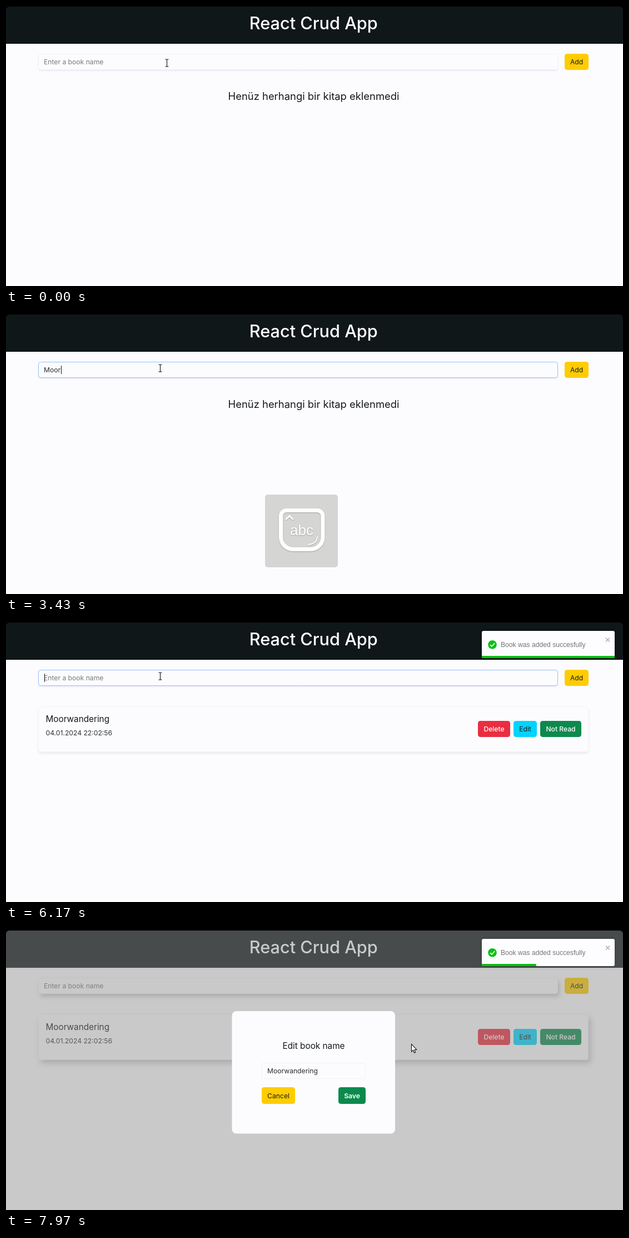
Write an HTML page with a canvas that moves like this. It is 1110 px wide and 504 px high and loops after 8 s.

```html
<!DOCTYPE html>
<html lang="tr">
<head>
<meta charset="utf-8">
<title>React Crud App</title>
<style>
html, body { margin: 0; width: 100%; height: 100%; overflow: hidden; background: #fcfcfe; }
canvas { display: block; width: 1110px; height: 504px; }
</style>
</head>
<body>
<canvas id="stage" width="1110" height="504"></canvas>
<script>
const ctx = document.getElementById('stage').getContext('2d');
const LOOP = 8000;
const BG = '#fcfcfe', INK = '#15191b', GREEN = '#0c8a4e', YELLOW = '#ffcc00', TOAST_GREEN = '#07c20f';
const SANS = 'Inter, sans-serif', ARIAL = '"Liberation Sans", Arial, sans-serif';
const BOOK = 'Moorwandering';
const KEYS = [1670, 2090, 2130, 2370, 3500, 3730, 3870, 4030, 4200, 4470, 4600, 4700, 4830];
const FOCUS = 470, CAPS_ON = 870, CAPS_OFF = 2070, ENTER = 5040;
const TOAST = 5360, TIMER = 6200, EDIT = 7480;

const clamp = v => Math.max(0, Math.min(1, v));
const part = (t, a, b) => clamp((t - a) / (b - a));
const mix = (a, b, k) => a + (b - a) * k;
const smooth = k => k * k * (3 - 2 * k);

// y of a CSS cubic-bezier at x
function bezier(x1, y1, x2, y2, x) {
  const at = (a, b, u) => 3 * a * u * (1 - u) ** 2 + 3 * b * u * u * (1 - u) + u ** 3;
  let lo = 0, hi = 1;
  for (let i = 0; i < 24; i++) {
    const mid = (lo + hi) / 2;
    if (at(x1, x2, mid) < x) lo = mid; else hi = mid;
  }
  return at(y1, y2, lo);
}

function text(str, x, y, size, color, weight = 400, align = 'left', family = SANS) {
  ctx.font = `${weight} ${size}px ${family}`;
  ctx.textAlign = align;
  ctx.fillStyle = color;
  ctx.fillText(str, x, y);
}

function box(x, y, w, h, r, fill, line) {
  ctx.beginPath();
  ctx.roundRect(x, y, w, h, r);
  if (fill) { ctx.fillStyle = fill; ctx.fill(); }
  if (line) { ctx.strokeStyle = line; ctx.lineWidth = 1; ctx.stroke(); }
}

function shadowed(color, dx, dy, blur, draw) {
  ctx.save();
  ctx.shadowColor = color;
  ctx.shadowOffsetX = dx;
  ctx.shadowOffsetY = dy;
  ctx.shadowBlur = blur;
  draw();
  ctx.restore();
}

function line(points, color, width) {
  ctx.beginPath();
  points.forEach(([x, y]) => ctx.lineTo(x, y));
  ctx.strokeStyle = color;
  ctx.lineWidth = width;
  ctx.stroke();
}

const buttons = {
  add: { x: 1005, y: 86, w: 43, h: 29, label: 'Add', fill: YELLOW, hover: '#ffd633', ink: INK, weight: 400 },
  del: { x: 849, y: 178, w: 58, h: 29, label: 'Delete', fill: '#ea2d40', hover: '#c9283a', ink: '#fff', weight: 500 },
  edit: { x: 913, y: 178, w: 42, h: 29, label: 'Edit', fill: '#02d4ff', hover: '#29deff', ink: INK, weight: 400 },
  read: { x: 961, y: 178, w: 74, h: 29, label: 'Not Read', fill: GREEN, hover: '#0a7441', ink: '#fff', weight: 500 },
  cancel: { x: 460, y: 283, w: 60, h: 30, label: 'Cancel', fill: YELLOW, ink: INK, weight: 400 },
  save: { x: 598, y: 283, w: 49, h: 30, label: 'Save', fill: GREEN, ink: '#fff', weight: 600 }
};
const inside = (b, p) => p.x >= b.x && p.x <= b.x + b.w && p.y >= b.y && p.y <= b.y + b.h;

function button(b, pointer) {
  box(b.x, b.y, b.w, b.h, 4.5, pointer && inside(b, pointer) ? b.hover : b.fill);
  text(b.label, b.x + b.w / 2, b.y + b.h / 2 + 4.5, 12.15, b.ink, b.weight, 'center');
}

const field = { x: 58.5, y: 86.5, w: 934, h: 28 };

function pointerAt(t) {
  if (t < 6400) {
    const k = smooth(part(t, 10, 330));
    return { x: mix(289, 277, k), y: mix(102, 97, k) };
  }
  if (t < EDIT) {
    const k = smooth(part(t, 6400, 7220)), j = 1 - k;
    return {
      x: j * j * 277 + 2 * j * k * 650 + k * k * 926,
      y: j * j * 97 + 2 * j * k * 250 + k * k * 180
    };
  }
  const k = smooth(part(t, EDIT + 40, 7940));
  return { x: mix(926, 729, k), y: mix(180, 205, k) };
}

function drawField(t, modal) {
  const focus = modal ? 0 : part(t, FOCUS - 30, FOCUS + 30);
  shadowed(modal ? 'rgba(50,50,80,.26)' : 'rgba(80,80,190,.13)', modal ? 3 : 0, modal ? 5 : 2, modal ? 9 : 3,
    () => box(field.x, field.y, field.w, field.h, 4, BG));
  box(field.x, field.y, field.w, field.h, 4, BG, '#f3f3f5');
  ctx.globalAlpha = focus;
  box(field.x, field.y, field.w, field.h, 4, null, '#96c3f6');
  ctx.globalAlpha = 1;

  const count = t < ENTER ? KEYS.filter(k => k <= t).length : 0;
  const typed = BOOK.slice(0, count);
  text(typed || 'Enter a book name', 68, 105, 12.15, typed ? '#2b2f32' : '#77787c');
  if (!focus) return;
  const since = [FOCUS - 30, ...KEYS, ENTER].filter(k => k <= t).pop();
  if (Math.floor((t - since) / 530) % 2 === 0) {
    ctx.fillStyle = '#111';
    ctx.fillRect(Math.round(68.6 + (typed ? ctx.measureText(typed).width : 0)), 93, 1, 15);
  }
}

function drawItem(pointer, modal) {
  shadowed(modal ? 'rgba(50,50,80,.28)' : 'rgba(120,120,110,.15)', modal ? 4 : 0, modal ? 6 : 3, modal ? 11 : 4,
    () => box(58.5, 152.5, 989, 81, 4, BG));
  box(58.5, 152.5, 989, 81, 4, BG, '#f4f4f9');
  text(BOOK, 71.5, 180, 15.3, INK);
  text('04.01.2024 22:02:56', 71.5, 204, 12.15, '#2b2f32');
  ['del', 'edit', 'read'].forEach(id => button(buttons[id], pointer));
}

function drawPage(t, pointer, modal) {
  ctx.fillStyle = BG;
  ctx.fillRect(0, 0, 1110, 504);
  ctx.fillStyle = '#101719';
  ctx.fillRect(0, 0, 1110, 68);
  text('React Crud App', 553.3, 41.5, 30.65, '#fff', 500, 'center');
  drawField(t, modal);
  button(buttons.add, pointer);
  if (t < ENTER) text('Henüz herhangi bir kitap eklenmedi', 553.5, 169, 18.4, INK, 400, 'center');
  else drawItem(pointer, modal);
}

// caps lock indicator
function drawCaps(t) {
  if (t < CAPS_ON || t > 5230) return;
  ctx.save();
  ctx.globalAlpha = 1 - part(t, 4600, 5230);
  box(466, 325, 131, 131, 5, '#d5d6d4');
  shadowed('rgba(90,90,90,.4)', 0, 1, 2, () => {
    ctx.beginPath();
    ctx.roundRect(494.5, 353.5, 75.5, 70, [10, 10, 22, 22]);
    ctx.strokeStyle = '#fff';
    ctx.lineWidth = 7;
    ctx.stroke();
    line([[503, 370], [510, 363.5], [517, 370]], '#fff', 3);
    const upper = t < CAPS_OFF;
    text(upper ? 'ABC' : 'abc', 532, 397.5, upper ? 23.4 : 26, '#fff', 400, 'center', ARIAL);
    ctx.beginPath();
    ctx.moveTo(560, 400);
    ctx.quadraticCurveTo(560, 414, 543, 415);
    ctx.lineWidth = 1.8;
    ctx.stroke();
  });
  ctx.restore();
}

function drawModal() {
  ctx.fillStyle = 'rgba(138,139,136,.45)';
  ctx.fillRect(0, 0, 1110, 504);
  box(406.5, 146, 293.5, 220.5, 8, BG);
  text('Edit book name', 553.5, 214, 15.3, INK, 400, 'center');
  box(460.5, 239.5, 186, 28, 4, BG, '#f2f2f5');
  text(BOOK, 470, 258, 12.15, '#2b2f32');
  button(buttons.cancel);
  button(buttons.save);
}

function toastShift(t) {
  const stops = [[0, 3000], [0.6, -25], [0.75, 10], [0.9, -5], [1, 0]];
  const k = part(t, TOAST, TOAST + 700);
  for (let i = 1; i < stops.length; i++) {
    const [a, from] = stops[i - 1], [b, to] = stops[i];
    if (k <= b) return mix(from, to, bezier(0.215, 0.61, 0.355, 1, (k - a) / (b - a)));
  }
  return 0;
}

function drawToast(t) {
  if (t < TOAST) return;
  ctx.save();
  ctx.translate(toastShift(t), 0);
  shadowed('rgba(0,0,0,.15)', 0, 1, 6, () => box(856, 16, 239, 49, 3, '#fdfdff'));
  ctx.beginPath();
  ctx.arc(875, 40.7, 7.8, 0, 7);
  ctx.fillStyle = TOAST_GREEN;
  ctx.fill();
  line([[871, 41], [874, 44], [879.3, 38]], '#fff', 1.7);
  text('Book was added succesfully', 890, 44.5, 12.15, '#757575', 400, 'left', ARIAL);
  line([[1079, 28.5], [1086, 35.5]], '#a5a5b8', 1.2);
  line([[1086, 28.5], [1079, 35.5]], '#a5a5b8', 1.2);
  ctx.fillStyle = TOAST_GREEN;
  ctx.fillRect(856, 61, 239 * (1 - part(t, TIMER, TIMER + 3000)), 4);
  ctx.restore();
}

const shapes = {
  arrow: new Path2D('M0 0V13.5L3 10.8L5 15.5L7.2 14.6L5.2 10H9.2Z'),
  hand: new Path2D('M-1.5 1Q-1.5-.5 0-.5Q1.5-.5 1.5 1V6Q3.5 5.3 4 6.8Q5.7 6 6.3 7.5Q8 7.3 8 9.5V13Q8 16 6.5 19H-.5Q-2 15.5-4.5 12.7Q-6 10.5-4.5 9.7Q-3 9.3-1.5 11.5Z'),
  ibeam: new Path2D('M-3-6.5H-1Q0-6.5 0-5.5Q0-6.5 1-6.5H3M0-5.5V5.5M-3 6.5H-1Q0 6.5 0 5.5Q0 6.5 1 6.5H3')
};

function drawPointer(p, modal) {
  const over = !modal && ['add', 'del', 'edit', 'read'].some(id => inside(buttons[id], p));
  const kind = over ? 'hand' : !modal && inside(field, p) ? 'ibeam' : 'arrow';
  ctx.save();
  ctx.translate(Math.round(p.x) + 0.5, Math.round(p.y) + 0.5);
  ctx.lineWidth = 1.1;
  ctx.strokeStyle = '#111';
  if (kind !== 'ibeam') { ctx.fillStyle = '#fff'; ctx.fill(shapes[kind]); }
  ctx.stroke(shapes[kind]);
  if (kind === 'hand') ctx.stroke(new Path2D('M1.5 6V9.5M4 6.8V10M6.3 7.5V10.5'));
  ctx.restore();
}

// rounded window edge
function drawEdge() {
  ctx.fillStyle = '#000';
  ctx.fillRect(0, 0, 1110, 1);
  ctx.beginPath();
  ctx.rect(0, 0, 1110, 12);
  ctx.roundRect(0, 1, 1110, 503, 6);
  ctx.save();
  ctx.clip('evenodd');
  ctx.fillRect(0, 0, 1110, 8);
  ctx.restore();
}

function render(t) {
  const modal = t >= EDIT;
  const p = pointerAt(t);
  drawPage(t, modal ? null : p, modal);
  drawCaps(t);
  if (modal) drawModal();
  drawEdge();
  drawToast(t);
  drawPointer(p, modal);
}

const start = performance.now();
function tick() {
  render((performance.now() - start) % LOOP);
  requestAnimationFrame(tick);
}
tick();
</script>
</body>
</html>
```
